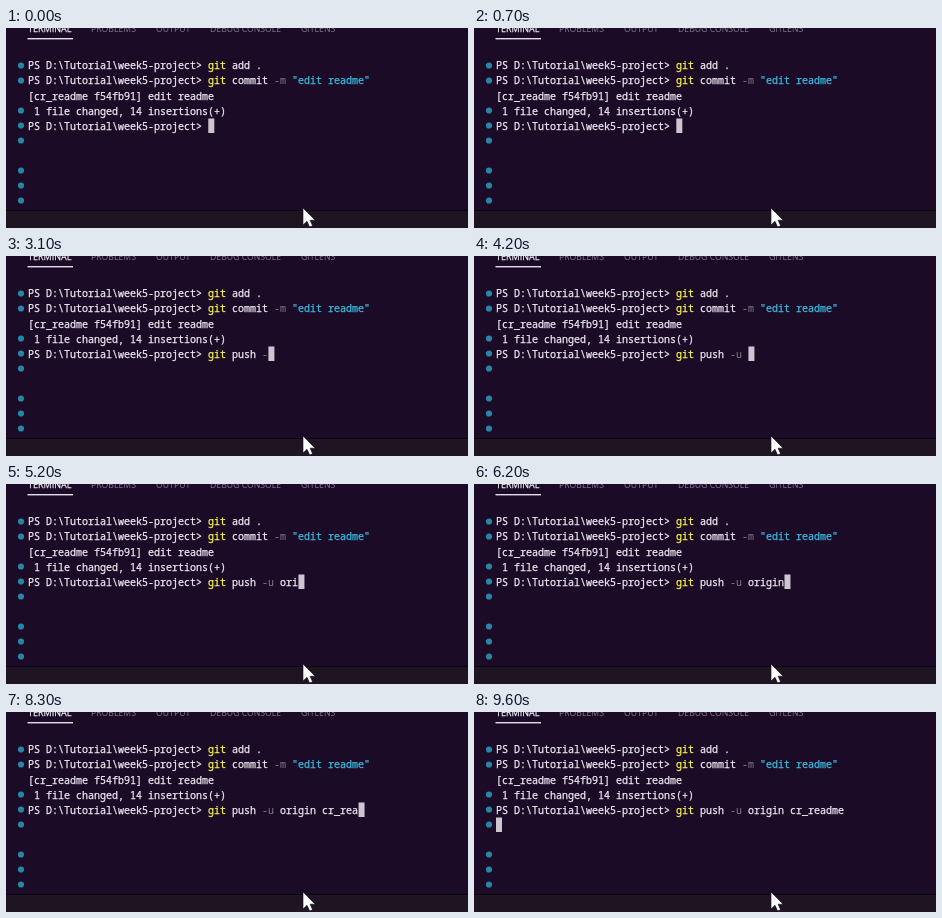
Write an HTML page that moves like this. It is 462 by 200 pixels and loops after 9.7 s.

```html
<!DOCTYPE html>
<html lang="en">
<head>
<meta charset="utf-8">
<title>Terminal</title>
<style>
  html, body { margin: 0; width: 100%; height: 100%; overflow: hidden; background: #1c0b26; }
  svg { display: block; }
  text { white-space: pre; }
  .term { font: 10px "Noto Sans Mono", "DejaVu Sans Mono", monospace; stroke-width: .25; }
  .term, .tabs .on { fill: #efeaf2; stroke: #efeaf2; }
  .tabs { font: 8.7px "Open Sans", "Noto Sans", sans-serif; fill: #85778f; }
  .tabs .on { font-size: 9px; stroke-width: .25; }
  .cmd { fill: #f8f84e; stroke: #f8f84e; }
  .flag { fill: #857b8b; stroke: none; }
  .str { fill: #3abce2; stroke: #3abce2; }
</style>
</head>
<body>
<svg width="462" height="200" viewBox="0 0 462 200">
  <rect width="462" height="200" fill="#1c0b26"/>
  <g class="tabs">
    <text class="on" x="22" y="4">TERMINAL</text>
    <text x="85" y="4">PROBLEMS</text>
    <text x="150" y="4">OUTPUT</text>
    <text x="204" y="4">DEBUG CONSOLE</text>
    <text x="295" y="4">GITLENS</text>
  </g>
  <rect x="21.5" y="10" width="45.5" height="1.4" fill="#e4dde8"/>
  <rect y="182" width="462" height="18" fill="#1f1421"/>
  <rect y="182" width="462" height="1" fill="#0d0612"/>
  <g id="dots" fill="#2786a6"></g>
  <g id="lines" class="term"></g>
  <rect id="caret" width="6" height="14.5" fill="#cdc6d1"/>
  <path d="M297 180V197L301 193.3L303.6 199L306.6 197.7L304.1 192.2H309.2Z"
        fill="#fff" stroke="#120818" stroke-width=".6"/>
</svg>
<script>
const NS = "http://www.w3.org/2000/svg";
const LOOP = 9700, LEFT = 22, CHAR = 6.01, ROW = 15;
const PROMPT = "PS D:\\Tutorial\\week5-project> ";
const COMMAND = "git push -u origin cr_readme";
const ENTER = 9400;

// Typing bursts: [first key, time between keys, number of keys]
const bursts = [
  [900, 140, 8],
  [2500, 400, 4],
  [4500, 300, 2],
  [5200, 200, 4],
  [6600, 300, 3],
  [7700, 200, 7]
];
const keys = bursts.flatMap(([start, gap, n]) =>
  Array.from({ length: n }, (_, i) => start + i * gap));

const byId = id => document.getElementById(id);

function add(parent, tag, attrs, content = "") {
  const el = document.createElementNS(NS, tag);
  for (const k in attrs) el.setAttribute(k, attrs[k]);
  el.textContent = content;
  parent.appendChild(el);
  return el;
}

function addLine(row, parts) {
  const line = add(byId("lines"), "text", { x: LEFT, y: Math.round(41.2 + row * 15.2) });
  return parts.map(([content, cls]) =>
    add(line, "tspan", cls ? { class: cls } : {}, content));
}

for (const row of [0, 1, 3, 4, 5, 7, 8, 9])
  add(byId("dots"), "circle", { cx: 15, cy: 37.5 + row * ROW, r: 3.1 });

addLine(0, [[PROMPT], ["git", "cmd"], [" add ."]]);
addLine(1, [[PROMPT], ["git", "cmd"], [" commit "], ["-m", "flag"], [" "], ['"edit readme"', "str"]]);
addLine(2, [["[cr_readme f54fb91] edit readme"]]);
addLine(3, [[" 1 file changed, 14 insertions(+)"]]);
const typed = addLine(4, [[PROMPT], ["", "cmd"], [""], ["", "flag"], [""]]).slice(1);
const cuts = [0, 3, 9, 11, COMMAND.length];
const caret = byId("caret");

function draw(t) {
  const n = keys.filter(k => t >= k).length;
  const text = COMMAND.slice(0, n);
  typed.forEach((el, i) => { el.textContent = text.slice(cuts[i], cuts[i + 1]); });
  const done = t >= ENTER;
  caret.setAttribute("x", LEFT + (done ? 0 : (PROMPT.length + n) * CHAR));
  caret.setAttribute("y", 90.5 + (done ? ROW : 0));
}

const begin = performance.now();
function tick() {
  draw((performance.now() - begin) % LOOP);
  requestAnimationFrame(tick);
}
tick();
</script>
</body>
</html>
```
